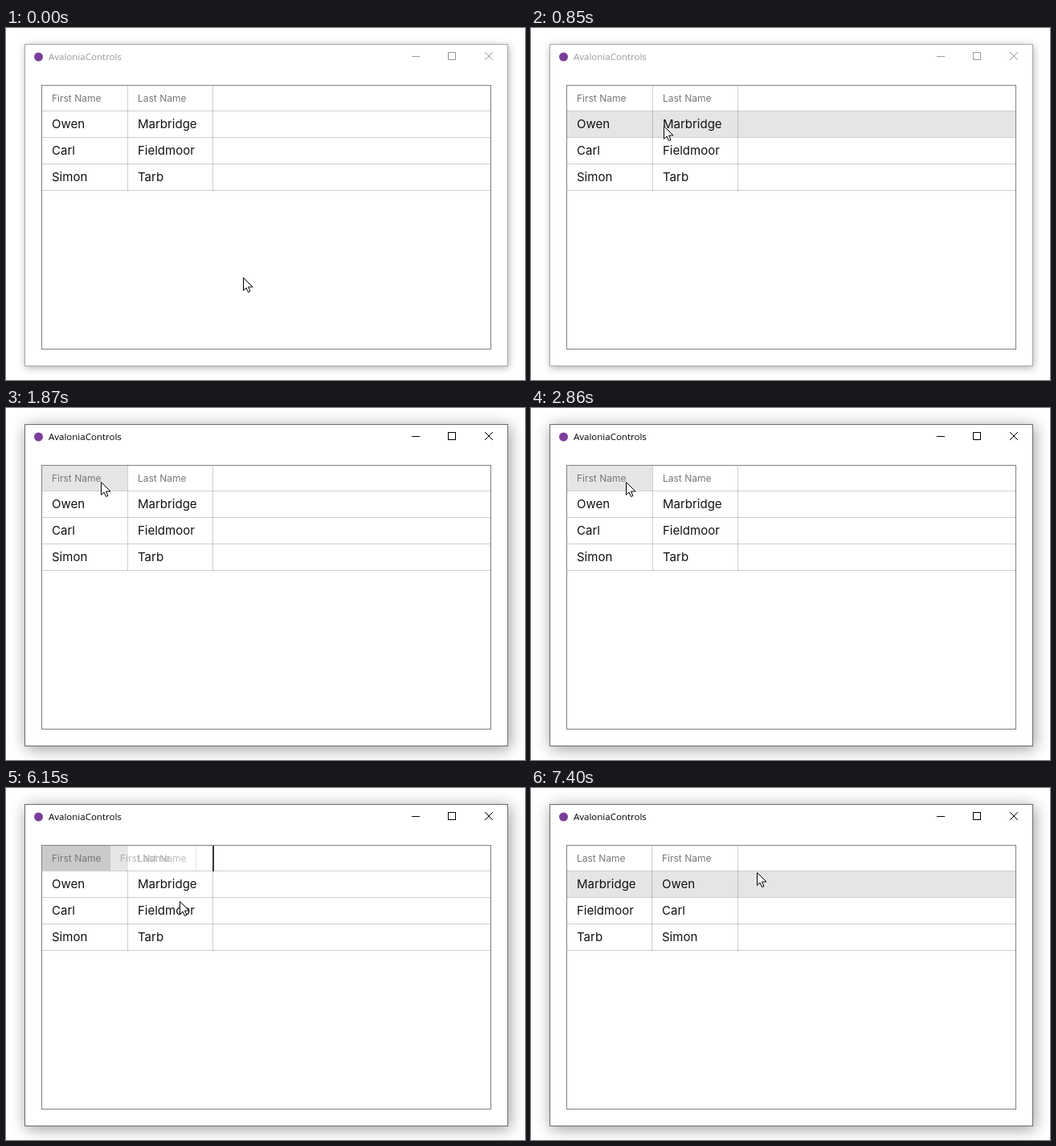
These frames come from a looping animation (646x439 px, 8 s). An HTML page with a canvas:

```html
<!DOCTYPE html>
<html lang="en">
<head>
<meta charset="utf-8">
<title>Column reorder</title>
<style>
html, body { margin: 0; width: 100%; height: 100%; overflow: hidden; background: #fff; }
canvas { display: block; }
</style>
</head>
<body>
<canvas id="stage" width="646" height="439"></canvas>
<script>
const ctx = document.getElementById('stage').getContext('2d');
const LOOP = 8000;
const HEADER_FONT = '12px Inter, sans-serif';
const CELL_FONT = '15px Inter, sans-serif';
const TITLE_FONT = '11.5px "Open Sans", sans-serif';
const LINE = 'rgba(0,0,0,.19)';
const HOVER = '#e5e5e5';
const PRESSED = '#cacaca';
const FIRST = ['First Name', 'Owen', 'Carl', 'Simon'];
const LAST = ['Last Name', 'Marbridge', 'Fieldmoor', 'Tarb'];
const LEFT = 45, RIGHT = 603, COLUMNS_END = 257;
const GRAB_X = 121;

const mix = (a, b, u) => a + (b - a) * u;
const clamp = u => Math.min(1, Math.max(0, u));
const smooth = u => u * u * (3 - 2 * u);
const glide = (u, power) => 1 - Math.pow(1 - smooth(u), power);
const between = (v, a, b) => v >= a && v < b;

function rect(x, y, w, h, color) {
  ctx.fillStyle = color;
  ctx.fillRect(x, y, w, h);
}

function frame(x, y, w, h, color) {
  ctx.strokeStyle = color;
  ctx.lineWidth = 1;
  ctx.strokeRect(x + .5, y + .5, w - 1, h - 1);
}

function text(str, x, y, font, color) {
  ctx.font = font;
  ctx.fillStyle = color;
  ctx.fillText(str, x, y);
}

// The pointer is sampled in discrete steps, as in a screen recording.
function approach(t) {
  const u = clamp((Math.floor((t - 440) / 58.4) + 1) / 14);
  return { x: Math.round(mix(295, 119, glide(u, 1.446))), y: Math.round(mix(311, 92, glide(u, 2.13))) };
}

function dragStep(t) {
  return t < 6150 ? Math.floor((t - 5400) / 62.5) + 1
                  : Math.min(26, 13 + Math.floor((t - 6150) / 63));
}

function dragPoint(step) {
  const u = clamp(step / 26);
  const y = u < .5 ? mix(91, 141, smooth(u * 2)) : mix(141, 105, smooth(u * 2 - 1));
  return { x: Math.round(mix(117, 281, glide(u, 1.335))), y: Math.round(y) };
}

function pointer(t) {
  if (t < 440) return { x: 295, y: 311 };
  if (t < 1440) return approach(t);
  if (t < 5160) return { x: 118, y: 92 };
  if (t < 5220) return { x: 117, y: 92 };
  if (t < 5400) return { x: 117, y: 91 };
  return dragPoint(dragStep(t));
}

function drawWindow(active) {
  rect(0, 0, 646, 439, '#fff');
  ctx.save();
  ctx.shadowColor = active ? 'rgba(0,0,0,.4)' : 'rgba(0,0,0,.3)';
  ctx.shadowBlur = active ? 18 : 9;
  ctx.shadowOffsetX = active ? 2 : 1;
  ctx.shadowOffsetY = active ? 3 : 2;
  rect(23, 20, 602, 402, '#fff');
  ctx.restore();
  frame(23, 20, 602, 402, active ? '#6b6b6b' : '#a8a8a8');

  ctx.fillStyle = '#7b3f9a';
  ctx.beginPath();
  ctx.arc(40.5, 36, 5.5, 0, Math.PI * 2);
  ctx.fill();

  const ink = active ? '#000' : '#999';
  text('AvaloniaControls', 53, 40, TITLE_FONT, ink);
  rect(505, 35, 10, 1, ink);
  frame(550, 30, 10, 10, ink);
  ctx.beginPath();
  ctx.moveTo(596, 30); ctx.lineTo(606, 40);
  ctx.moveTo(606, 30); ctx.lineTo(596, 40);
  ctx.stroke();
}

function drawGrid(columns, divider, point, pressed, dragging) {
  const inside = between(point.x, LEFT, RIGHT);
  const column = between(point.x, LEFT, divider) ? 0 : between(point.x, divider, COLUMNS_END) ? 1 : -1;
  const starts = [LEFT, divider + 1];
  const ends = [divider, COLUMNS_END];

  if (pressed) {
    rect(LEFT, 72, divider - LEFT, 31, PRESSED);
  } else if (between(point.y, 72, 104) && column >= 0) {
    rect(starts[column], 72, ends[column] - starts[column], 31, HOVER);
  }
  for (let row = 0; row < 3; row++) {
    const top = 104 + row * 33;
    if (!dragging && inside && between(point.y, top, top + 33)) rect(LEFT, top, RIGHT - LEFT, 32, HOVER);
  }

  for (let i = 0; i < 4; i++) rect(LEFT, 103 + i * 33, RIGHT - LEFT, 1, LINE);
  for (const x of ends) rect(x, 72, 1, 131, LINE);
  columns.forEach((column, c) => column.forEach((str, i) => {
    const x = c ? divider + 13 : 57;
    if (i) text(str, x, 92 + i * 33, CELL_FONT, '#111');
    else text(str, x, 92, HEADER_FONT, '#777');
  }));
  frame(44, 71, 560, 330, '#808080');
}

function drawDrag(step, x) {
  const offset = dragPoint(step - 1).x - GRAB_X;
  if (offset < 0) return;
  const ghostX = LEFT + offset;
  ctx.save();
  ctx.globalAlpha = .53;
  rect(ghostX, 72, 107, 31, '#fff');
  rect(ghostX + 106, 72, 1, 31, '#d0d0d0');
  text(FIRST[0], ghostX + 12, 92, HEADER_FONT, '#777');
  ctx.restore();
  rect(x < 204 ? 151 : COLUMNS_END, 72, 2, 32, '#333');
}

function drawPointer({ x, y }) {
  const outline = [[0, 0], [0, 16], [3.5, 12.5], [6, 18], [8.5, 17], [6, 11.5], [11.5, 11.5]];
  ctx.save();
  ctx.translate(x + .5, y + .5);
  ctx.beginPath();
  outline.forEach(([px, py]) => ctx.lineTo(px, py));
  ctx.closePath();
  ctx.fillStyle = '#fff';
  ctx.fill();
  ctx.strokeStyle = '#000';
  ctx.lineWidth = 1;
  ctx.stroke();
  ctx.restore();
}

function draw(t) {
  const point = pointer(t);
  const dragging = between(t, 5400, 7400);
  const pressed = dragging || between(t, 1750, 1870) || between(t, 2740, 2860);
  const swapped = t >= 7400;
  drawWindow(t >= 1750);
  drawGrid(swapped ? [LAST, FIRST] : [FIRST, LAST], swapped ? 150 : 151, point, pressed, dragging);
  if (dragging) drawDrag(dragStep(t), point.x);
  drawPointer(point);
}

const start = performance.now();
function tick() {
  draw((performance.now() - start) % LOOP);
  requestAnimationFrame(tick);
}
tick();
</script>
</body>
</html>
```
